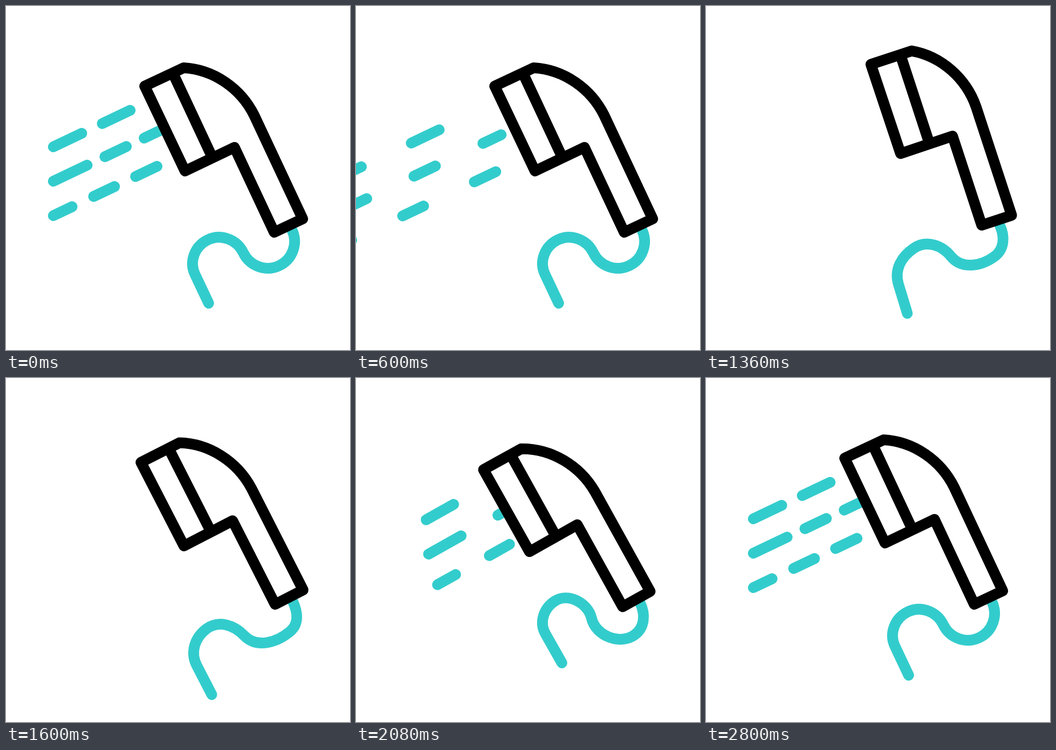
Animation of 640x640 px, one loop 3 s. Source, as an HTML page with a canvas:

```html
<!DOCTYPE html>
<html lang="en">
<head>
<meta charset="utf-8">
<title>Shower head</title>
<style>
html, body { margin: 0; height: 100%; overflow: hidden; background: #fff; }
canvas { display: block; width: 100vmin; height: 100vmin; }
</style>
</head>
<body>
<canvas width="640" height="640"></canvas>
<script>
const ctx = document.querySelector('canvas').getContext('2d');
const LOOP = 3000, STEP = 40, SLOPE = 0.475, RAD = Math.PI / 180;
const PIVOT = { x: 564.5, y: 465.5 };
const JOINT = { x: 532, y: 416.5 };

// Each jet lists its dashes as left x, width and an optional late arrival
const jets = [
  [[88, 53], [179, 52]],
  [[88, 63], [184, 40], [257, 34]],
  [[88, 35, 42], [163, 39], [241, 40]]
];
const waves = [
  { leave: 160, arrive: 2518 },
  { leave: 256, arrive: 2631 },
  { leave: 409, arrive: 2787 }
];

// Vertical bounce of the hose: time, offset
const bounceKeys = [[710, 0], [960, 0], [1360, 28], [1540, 46], [1880, -23], [2320, -14], [2640, 0]];

function ease(t, from, to) {
  const p = Math.min(1, Math.max(0, (t - from) / (to - from)));
  return (1 - Math.cos(Math.PI * p)) / 2;
}

// Smooth curve through the keys, at rest at both ends
function follow(keys, t) {
  const last = keys.length - 1;
  if (t <= keys[0][0]) return keys[0][1];
  if (t >= keys[last][0]) return keys[last][1];
  const i = keys.findIndex(key => key[0] > t) - 1;
  const [t0, a] = keys[i], [t1, b] = keys[i + 1];
  const span = t1 - t0, p = (t - t0) / span, q = 1 - p;
  const speed = k => k === 0 || k === last ? 0 :
    (keys[k + 1][1] - keys[k - 1][1]) / (keys[k + 1][0] - keys[k - 1][0]);
  return q * q * (1 + 2 * p) * a + p * p * (3 - 2 * p) * b +
    span * p * q * (q * speed(i) - p * speed(i + 1));
}

// The head tips up, swings down and settles, each in equal time
function headPose(t) {
  const [rise, swing, settle] = [0, 1, 2].map(n => ease(t, 710 + 556 * n, 1266 + 556 * n));
  const up = rise - swing, down = swing - settle;
  return { angle: 8 * up - 7 * down, x: 8.7 * up, y: -6 * up };
}

function place(pose, point) {
  const c = Math.cos(pose.angle * RAD), s = Math.sin(pose.angle * RAD);
  const dx = point.x - PIVOT.x, dy = point.y - PIVOT.y;
  return { x: PIVOT.x + pose.x + dx * c - dy * s, y: PIVOT.y + pose.y + dx * s + dy * c };
}

// The hose hangs from the joint; its free end bounces and sways most
function drawHose(t, pose) {
  const joint = place(pose, JOINT), dx = joint.x - JOINT.x, dy = joint.y - JOINT.y;
  const bounce = follow(bounceKeys, t), bend = Math.abs(bounce);
  const node = (x, y, heading) => [x + dx, y + dy, heading];
  const bight = node(351.5 - 1.1 * pose.angle, 499 + bounce);
  const end = node(377 - 2.4 * pose.angle, 553 + bounce);
  bight[2] = end[2] = Math.atan2(end[1] - bight[1], end[0] - bight[0]) / RAD;
  const nodes = [
    [joint.x, joint.y, 64.6],
    node(508.5 + 0.5 * bend, 483 - 0.28 * bend, 154.5 - 0.38 * bend),
    node(441.5, 459 + 0.57 * bounce, 244.5 - 0.5 * bounce),
    node(375.5 - 0.1 * bend, 435 + 0.88 * bounce, 154.5 - 0.3 * bend),
    bight,
    end
  ];
  ctx.beginPath();
  ctx.moveTo(joint.x, joint.y);
  for (let i = 1; i < nodes.length; i++) {
    const [x0, y0, a0] = nodes[i - 1], [x1, y1, a1] = nodes[i];
    const reach = 0.39 * Math.hypot(x1 - x0, y1 - y0);
    ctx.bezierCurveTo(
      x0 + reach * Math.cos(a0 * RAD), y0 + reach * Math.sin(a0 * RAD),
      x1 - reach * Math.cos(a1 * RAD), y1 - reach * Math.sin(a1 * RAD), x1, y1);
  }
  ctx.stroke();
}

// Dashes speed up as they leave and slow down as they arrive
function waterShift(t, { leave, arrive }, late) {
  return t < 1400
    ? -131 * (Math.max(0, t - leave) / 440) ** 2.2
    : 131 * (Math.max(0, arrive + late - t) / 638) ** 2.2;
}

function drawWater(t) {
  ctx.save();
  // Keep the water in front of the nozzle face
  ctx.beginPath();
  ctx.moveTo(-900, -167);
  ctx.lineTo(108, -167);
  ctx.lineTo(483, 623);
  ctx.lineTo(-900, 623);
  ctx.clip();
  ctx.beginPath();
  jets.forEach((dashes, row) => dashes.forEach(([x, width, late = 0], i) => {
    const left = x + waterShift(t, waves[i], late);
    const lineY = px => 262 + 64 * row - SLOPE * (px - 88);
    ctx.moveTo(left, lineY(left));
    ctx.lineTo(left + width, lineY(left + width));
  }));
  ctx.stroke();
  ctx.restore();
}

function drawHead() {
  ctx.beginPath();
  ctx.moveTo(258, 149);
  ctx.lineTo(330.5, 115);
  ctx.bezierCurveTo(386, 118, 437, 153, 462, 204);
  ctx.lineTo(552, 396);
  ctx.lineTo(499, 421);
  ctx.lineTo(425, 263);
  ctx.lineTo(333, 307);
  ctx.closePath();
  ctx.fill();
  ctx.moveTo(311, 126);
  ctx.lineTo(384, 282);
  ctx.stroke();
}

function draw(t) {
  const pose = headPose(t);
  ctx.fillStyle = '#fff';
  ctx.fillRect(0, 0, 640, 640);
  ctx.lineWidth = 20;
  ctx.lineCap = ctx.lineJoin = 'round';
  ctx.strokeStyle = '#33cccc';
  drawHose(t, pose);
  ctx.save();
  ctx.translate(PIVOT.x + pose.x, PIVOT.y + pose.y);
  ctx.rotate(pose.angle * RAD);
  ctx.translate(-PIVOT.x, -PIVOT.y);
  drawWater(t);
  ctx.strokeStyle = '#000';
  drawHead();
  ctx.restore();
}

const start = performance.now();
function tick() {
  const t = (performance.now() - start) % LOOP;
  draw(Math.floor(t / STEP) * STEP);
  requestAnimationFrame(tick);
}
tick();
</script>
</body>
</html>
```
